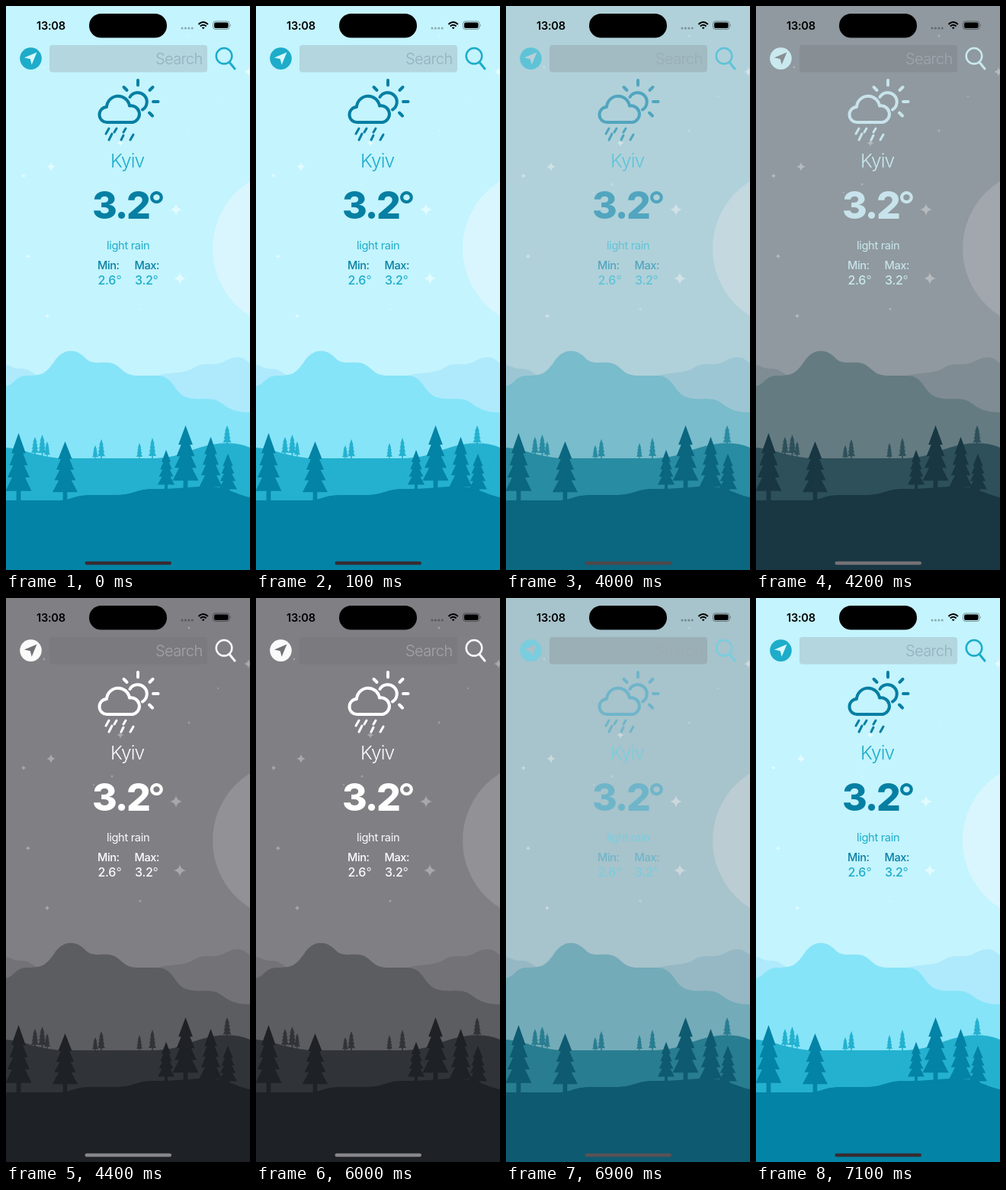
An HTML page that plays this animation: 320 by 737 pixels, repeating every 8000 ms.

```html
<!DOCTYPE html>
<html lang="en">
<head>
<meta charset="utf-8">
<title>Weather</title>
<style>
html, body { margin: 0; width: 100%; height: 100%; overflow: hidden; }
svg {
  display: block; width: 100vw; height: 100vh;
  font-family: Inter, "Liberation Sans", sans-serif;
  --t: 0%;
  animation: theme 8s step-end infinite;
}
/* --t is the share of the dark theme */
@keyframes theme {
  0% { --t: 0%; }
  50% { --t: 30%; }
  51.25% { --t: 55%; }
  52.5% { --t: 78%; }
  53.75% { --t: 94%; }
  55% { --t: 100%; }
  83.75% { --t: 93%; }
  85% { --t: 70%; }
  86.25% { --t: 42%; }
  87.5% { --t: 15%; }
  88.75%, 100% { --t: 0%; }
}
.fill { fill: color-mix(in srgb, var(--b) var(--t), var(--a)); }
.line {
  fill: none; stroke-linecap: round; stroke-linejoin: round;
  stroke: color-mix(in srgb, var(--b) var(--t), var(--a));
}
.sky { --a: #c4f4fe; --b: #807f84; }
.moon { --a: #d9f6fe; --b: #929196; }
.star { --a: #e2fbff; --b: #a8a8ac; }
.dot { --a: #d0f7ff; --b: #a0a0a4; }
.far { --a: #afeafc; --b: #737276; }
.mid { --a: #86e4f8; --b: #5c5d61; }
.hill { --a: #24b1cf; --b: #303439; }
.front { --a: #0383a5; --b: #1e2126; }
.deep { --a: #067fa3; --b: #fff; }
.teal { --a: #1dacca; --b: #fafafa; }
.arrow { --a: #d8f9ff; --b: #717075; }
.field { --a: #b3d6df; --b: #7b7a7f; }
.hint { --a: #94b1bb; --b: #a5a4a9; }
.home { --a: #382c30; --b: #87868b; }
</style>
</head>
<body>
<svg viewBox="0 0 320 737" preserveAspectRatio="none">
  <defs>
    <path id="tree" d="M0 0L.55 .3H.34L.7 .48H.43L.85 .66H.5L1 .86H.17V1.02H-.17V.86H-1L-.5 .66H-.85L-.43 .48H-.7L-.34 .3H-.55Z"/>
    <path id="spark" d="M0-1Q.14-.14 1 0Q.14 .14 0 1Q-.14 .14-1 0Q-.14-.14 0-1Z"/>
  </defs>

  <rect class="fill sky" width="320" height="737"/>
  <circle class="fill moon" cx="374.5" cy="317" r="103.5"/>
  <g class="fill star">
    <use href="#spark" transform="translate(223 266) scale(8)"/>
    <use href="#spark" transform="translate(228 356) scale(8)"/>
    <use href="#spark" transform="translate(59 210) scale(6)"/>
    <use href="#spark" transform="translate(150 179) scale(5)"/>
    <use href="#spark" transform="translate(318 86) scale(6)"/>
    <use href="#spark" transform="translate(23 222) scale(3.5)"/>
    <use href="#spark" transform="translate(29 327) scale(3.5)"/>
    <use href="#spark" transform="translate(54 405) scale(3.5)"/>
  </g>
  <g class="fill dot">
    <circle cx="139" cy="233" r="1.5"/>
    <circle cx="115" cy="244" r="1"/>
    <circle cx="176" cy="396" r="1.6"/>
    <circle cx="240" cy="163" r="1.4"/>
    <circle cx="278" cy="118" r="1.1"/>
    <circle cx="240" cy="39" r="1.4"/>
    <circle cx="50" cy="80" r="1.4"/>
  </g>

  <path class="fill far" d="M0 469C8 470 8 474 20 474C32 474 34 480 42 483V520H0ZM190 486C210 477 232 482 246 473C260 464 270 471 283 466C296 459 307 454 320 467V560H190Z"/>
  <path class="fill mid" d="M0 497C13 493 12 483 28 483C48 483 52 480 63 465C74 447 92 447 104 460C113 469 124 465 135 466C151 468 152 483 172 483H198C222 483 219 508 240 512C252 515 262 512 272 514C286 517 289 531 320 531V620H0Z"/>
  <g class="fill hill">
    <path d="M0 577C24 579 38 588 70 591H195C224 590 234 583 254 577C278 570 300 569 320 577V680H0Z"/>
    <use href="#tree" transform="translate(38 563) scale(5 24)"/>
    <use href="#tree" transform="translate(47.5 560) scale(5.5 28)"/>
    <use href="#tree" transform="translate(54 569) scale(4 20)"/>
    <use href="#tree" transform="translate(117 574) scale(4 18)"/>
    <use href="#tree" transform="translate(125 566) scale(5 26)"/>
    <use href="#tree" transform="translate(175 571) scale(4 21)"/>
    <use href="#tree" transform="translate(192 564) scale(5 28)"/>
    <use href="#tree" transform="translate(290 548) scale(5.5 26)"/>
  </g>
  <g class="fill front">
    <path d="M0 646H68C86 646 88 639 112 639H146C170 638 170 631 194 631C230 631 244 627 268 628C292 629 300 638 320 642V737H0Z"/>
    <use href="#tree" transform="translate(16.5 558) scale(17 88)"/>
    <use href="#tree" transform="translate(77.5 569) scale(16.5 77)"/>
    <use href="#tree" transform="translate(210 580) scale(11 53)"/>
    <use href="#tree" transform="translate(235.5 548) scale(17 84)"/>
    <use href="#tree" transform="translate(268.5 563) scale(15 76)"/>
    <use href="#tree" transform="translate(291 585) scale(12 54)"/>
  </g>

  <rect x="109" y="10" width="102" height="31.5" rx="15.75"/>
  <text x="40" y="30.7" font-size="14.6" font-weight="600" letter-spacing="-.25">13:08</text>
  <g opacity=".3">
    <circle cx="231" cy="29" r="1.5"/>
    <circle cx="235.4" cy="29" r="1.5"/>
    <circle cx="239.8" cy="29" r="1.5"/>
    <circle cx="244.2" cy="29" r="1.5"/>
  </g>
  <g fill="none" stroke="#000" stroke-width="2">
    <path d="M252.5 24Q258.7 18 264.9 24M254.8 26.6Q258.7 23 262.6 26.6"/>
    <path d="M256.8 28.2Q258.7 26.7 260.6 28.2L258.7 30.2Z" fill="#000" stroke="none"/>
  </g>
  <rect x="271.5" y="20" width="21.5" height="10.5" rx="3.3" fill="none" stroke="#000" stroke-opacity=".4"/>
  <rect x="273" y="21.5" width="18.5" height="7.5" rx="2"/>
  <path d="M294.2 23.5q1.6 1.7 0 3.5Z" opacity=".45"/>

  <circle class="fill teal" cx="32.5" cy="68.6" r="14.3"/>
  <path class="fill arrow" d="M40.5 60.5L33.7 76.8L31.8 69.3L24 67.6Z"/>
  <rect class="fill field" x="57" y="51" width="207" height="35.5" rx="4"/>
  <text class="fill hint" x="196" y="76" font-size="20" font-weight="300" letter-spacing="-.6">Search</text>
  <g class="line teal" stroke-width="2.5">
    <circle cx="286" cy="65.3" r="10.3"/>
    <path d="M293 73.5L300 82" stroke-width="3"/>
  </g>

  <g class="line deep" stroke-width="4">
    <path d="M133 152A10 10 0 0 1 132 132A15.1 15.1 0 0 1 162 130.5A10.8 10.8 0 1 1 166 152Z"/>
    <path d="M162.5 119A12 12 0 1 1 179 135.5"/>
    <path d="M173 97V103.5M154.5 106L158.5 110M192.5 106L188.5 110M193 125H199.5M188 139.5L192 143.5"/>
    <path d="M135 160l-4 7M145 160l-3 5M157 160l-3 5M139 167l-4 8M154 169l-3 6M167 168l-4 7" stroke-width="3"/>
  </g>

  <text class="fill teal" x="137" y="211" font-size="24.5" font-weight="300" letter-spacing="-.9">Kyiv</text>
  <text class="fill deep" x="113" y="278" font-size="50" font-weight="800" letter-spacing="-2.2">3.2<tspan x="186" font-weight="500">°</tspan></text>
  <text class="fill teal" x="132" y="318" font-size="14.7" letter-spacing="-.35">light rain</text>
  <g class="fill deep" font-size="14.6" font-weight="500" letter-spacing="-.4">
    <text x="120" y="344">Min:</text>
    <text x="168.5" y="344">Max:</text>
  </g>
  <g class="fill teal" font-size="16" font-weight="500" letter-spacing="-.3">
    <text x="120.5" y="364">2.6<tspan x="144.5" font-weight="300">°</tspan></text>
    <text x="169" y="364">3.2<tspan x="192.5" font-weight="300">°</tspan></text>
  </g>

  <rect class="fill home" x="103.5" y="725.7" width="113.5" height="4.6" rx="2.3"/>
</svg>
</body>
</html>
```
